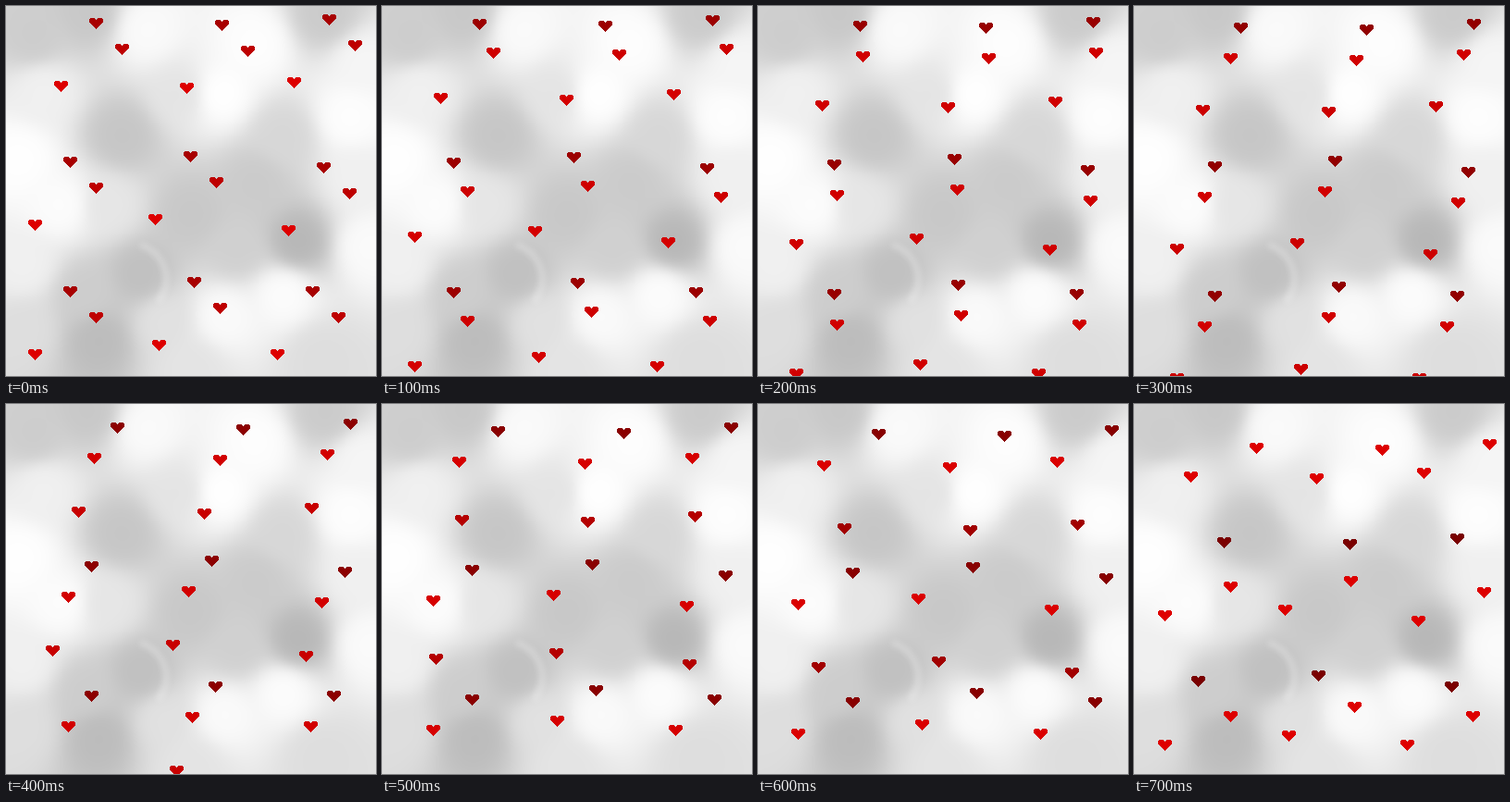
An HTML page with a canvas for the animation above (0.8 s loop, 400 by 400 pixels).

```html
<!DOCTYPE html>
<html>
<head>
<meta charset="utf-8">
<style>
html, body { margin: 0; width: 100%; height: 100%; overflow: hidden; background: #ececec; }
canvas { position: absolute; left: 0; top: 0; }
</style>
</head>
<body>
<canvas id="sky" width="400" height="400"></canvas>
<canvas id="hearts" width="400" height="400"></canvas>
<script>
const sky = document.getElementById('sky').getContext('2d');
const ctx = document.getElementById('hearts').getContext('2d');

// Cloud key points (x, y, gray), blended smoothly by distance
const clouds = [
  [30, 35, 205], [90, 8, 200], [40, 90, 240], [150, 25, 250], [270, 40, 253],
  [345, 10, 203], [385, 60, 245], [230, 95, 255], [370, 120, 253], [190, 95, 228],
  [125, 140, 198], [300, 140, 215], [15, 165, 254], [60, 215, 252], [110, 215, 230],
  [200, 225, 200], [270, 190, 203], [380, 185, 240], [315, 255, 183], [250, 262, 208],
  [390, 260, 250], [20, 280, 240], [145, 290, 192], [85, 310, 205], [300, 310, 252],
  [100, 360, 188], [20, 350, 222], [170, 340, 225], [235, 335, 250], [340, 378, 222],
  [200, 390, 228]
];

function drawSky() {
  const img = sky.createImageData(400, 400);
  for (let i = 0; i < 160000; i++) {
    const x = i % 400, y = Math.floor(i / 400);
    let sum = 0, total = 0;
    for (const [cx, cy, gray] of clouds) {
      const w = ((x - cx) ** 2 + (y - cy) ** 2 + 300) ** -2;
      sum += w * gray;
      total += w;
    }
    img.data.fill(sum / total, i * 4, i * 4 + 3);
    img.data[i * 4 + 3] = 255;
  }
  sky.putImageData(img, 0, 0);
  // Pale rim of the swirl
  sky.filter = 'blur(3px)';
  sky.strokeStyle = 'rgba(255,255,255,.3)';
  sky.lineWidth = 6;
  sky.beginPath();
  sky.arc(135, 295, 38, -1.3, .7);
  sky.stroke();
}

const groups = [
  [97, 18], [233, 20], [349, 14],
  [69, 168], [199, 162], [343, 174],
  [69, 308], [203, 298], [331, 308]
];

// Three hearts swing down from each group: x, y, red at the key steps
const keySteps = [0, 1, 2, 4, 6, 7];
const paths = [
  [[0, 0, 168], [8, 1, 156], [13, 3, 152], [23, 7, 140], [33, 14, 136], [35, 29, 221]],
  [[28, 28, 190], [23, 32, 206], [16, 36, 208], [-2, 40, 210], [-26, 48, 218], [-36, 60, 222]],
  [[-38, 68, 221], [-34, 81, 212], [-28, 89, 208], [-19, 98, 200], [-4, 116, 162], [0, 131, 122]]
];

function at(path, step) {
  const k = Math.max(1, keySteps.findIndex(s => s >= step));
  const f = (step - keySteps[k - 1]) / (keySteps[k] - keySteps[k - 1]);
  return path[k].map((v, i) => Math.round(path[k - 1][i] * (1 - f) + v * f));
}

function heart(x, y) {
  for (const side of [-4, 4]) {
    ctx.fillRect(x + side - 2, y - 5, 5, 1);
    ctx.fillRect(x + side - 3, y - 4, 7, 1);
  }
  ctx.fillRect(x - 7, y - 3, 15, 3);
  for (let w = 6; w >= 0; w--) ctx.fillRect(x - w, y + 6 - w, 2 * w + 1, 1);
}

function frame() {
  const step = Math.floor(performance.now() / 100) % 8;
  ctx.clearRect(0, 0, 400, 400);
  for (const path of paths) {
    const [dx, dy, red] = at(path, step);
    ctx.fillStyle = `rgb(${red},0,0)`;
    for (const [x, y] of groups) heart(x + dx, y + dy);
  }
  requestAnimationFrame(frame);
}

drawSky();
frame();
</script>
</body>
</html>
```
